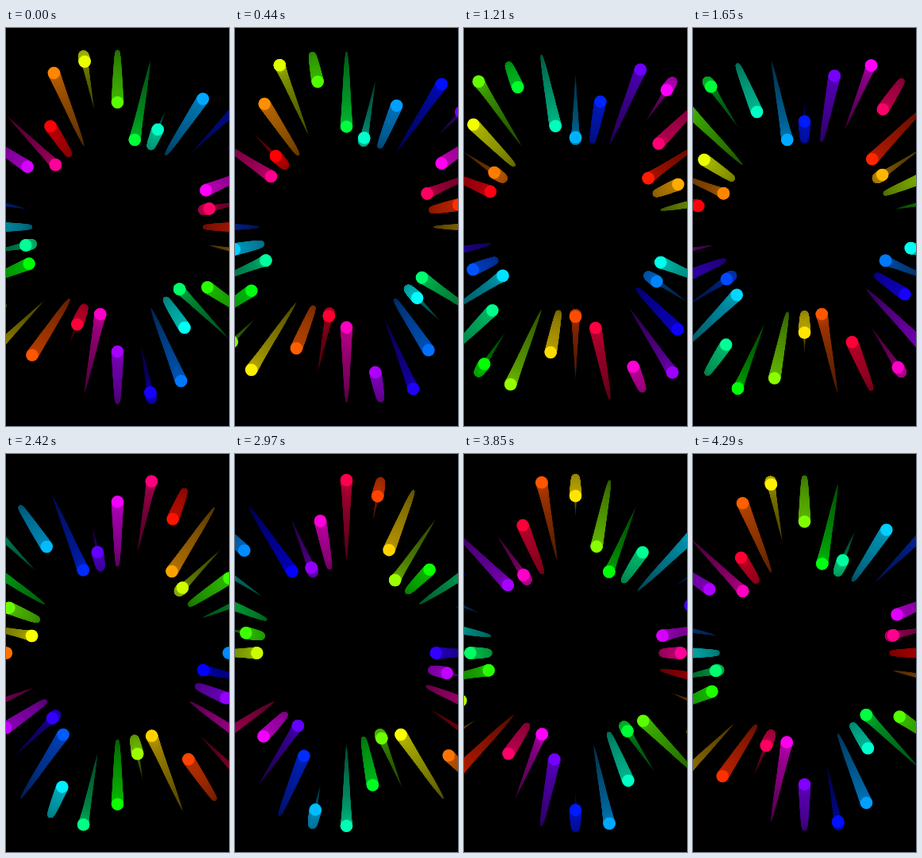
Recreate the animation shown at these times as an HTML page with a canvas. Size 281 px wide and 500 px high, loop 4.4 s.

```html
<!DOCTYPE html>
<html lang="en">
<head>
<meta charset="utf-8">
<title>Pulsing ring</title>
<style>
  html, body { margin: 0; height: 100%; overflow: hidden; background: #000; }
  canvas { display: block; }
</style>
</head>
<body>
<canvas id="stage" width="281" height="500"></canvas>
<script>
const ctx = document.getElementById('stage').getContext('2d');
const STEP_MS = 110, STEPS = 40;
const RAYS = 32, RADIUS = 165, SWING = 55;
const DOT = 7.75, TRAIL = 140; // trail length in degrees of phase
const rad = deg => deg * Math.PI / 180;

function drawRay(angle, time) {
  const hue = (time + 3 * angle) % 360;
  const dx = Math.cos(rad(angle)), dy = Math.sin(rad(angle));
  // Oldest dots first, so the bright head ends up on top.
  for (let age = TRAIL - 1; age >= 0; age--) {
    const fade = age / TRAIL;
    const light = age ? 35 - 22.5 * fade : 50;
    const r = RADIUS + SWING * Math.sin(rad(time - age + 6 * angle));
    ctx.fillStyle = `hsl(${hue}, 100%, ${light}%)`;
    ctx.beginPath();
    ctx.arc(140.5 + r * dx, 250 + r * dy, DOT * (1 - fade), 0, 2 * Math.PI);
    ctx.fill();
  }
}

function draw(step) {
  ctx.fillStyle = '#000';
  ctx.fillRect(0, 0, 281, 500);
  const time = 360 * (step + 1) / STEPS;
  for (let i = 0; i < RAYS; i++) drawRay(360 * i / RAYS, time);
}

const start = performance.now();
let shown = -1;

function tick() {
  const step = Math.floor((performance.now() - start) / STEP_MS) % STEPS;
  if (step !== shown) draw(shown = step);
  requestAnimationFrame(tick);
}
tick();
</script>
</body>
</html>
```
